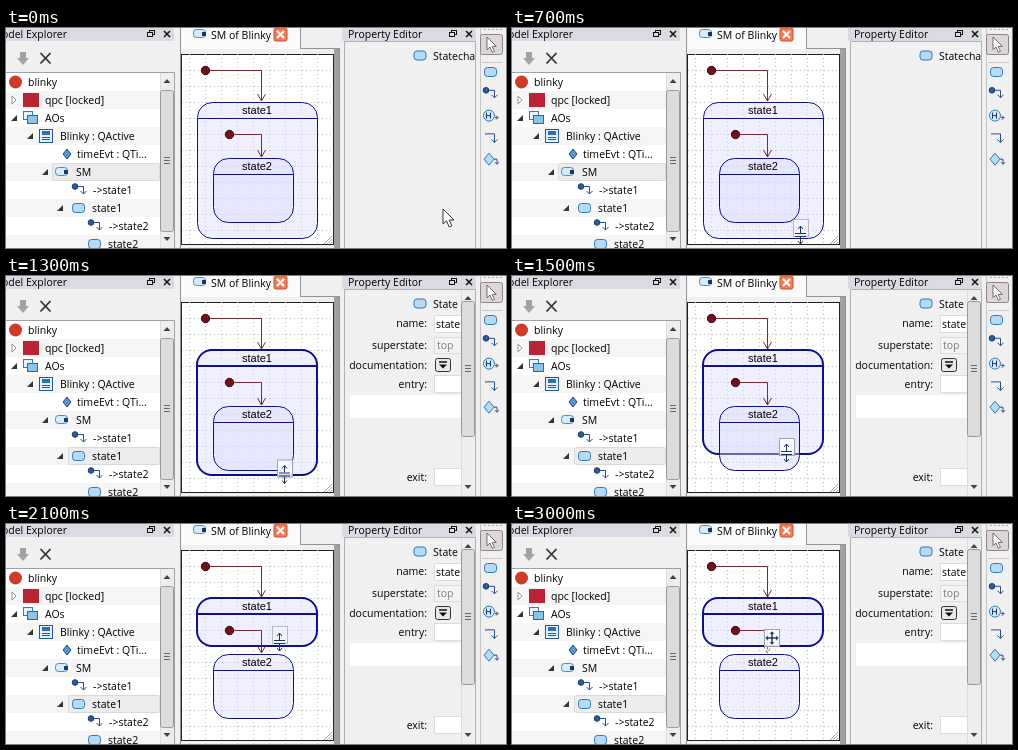
These frames come from a looping animation (500x220 px, 3.3 s). An HTML page:

```html
<!DOCTYPE html>
<html lang="en">
<head>
<meta charset="utf-8">
<title>State editor</title>
<style>
  html, body { margin: 0; width: 100%; height: 100%; overflow: hidden; }
  svg { display: block; width: 500px; height: 220px; }
  text { font: 10.5px "Open Sans", sans-serif; fill: #000; }
  .label { font: 11px "Liberation Sans", Arial, sans-serif; text-anchor: middle; }
  .end { text-anchor: end; }
  .line { fill: none; stroke: #782830; }
  .box { fill: #d8d8ff; fill-opacity: .42; stroke: #101088; }
</style>
</head>
<body>
<svg id="stage" viewBox="0 0 500 220" xmlns="http://www.w3.org/2000/svg"></svg>
<script>
const stage = document.getElementById('stage');
const LOOP = 3300;

const rect = (x, y, w, h, fill, more = '') =>
  `<rect x="${x}" y="${y}" width="${w}" height="${h}" fill="${fill}" ${more}/>`;
const path = (d, stroke, more = '') => `<path d="${d}" fill="none" stroke="${stroke}" ${more}/>`;
const shape = (d, fill, more = '') => `<path d="${d}" fill="${fill}" ${more}/>`;
const dot = (x, y, r, fill, more = '') => `<circle cx="${x}" cy="${y}" r="${r}" fill="${fill}" ${more}/>`;
const text = (x, y, s, more = '') => `<text x="${x}" y="${y}" ${more}>${s}</text>`;
const at = (x, y, s) => `<g transform="translate(${x} ${y})">${s}</g>`;
const group = (id, s) => `<g id="${id}">${s}</g>`;
const outline = c => `stroke="${c}"`;

// Icons, centred on 0,0
const icons = {
  state: rect(-5.5, -4.5, 12, 9, '#b4dcf8', 'rx="3" stroke="#3078b0"'),
  chart: rect(-6.5, -4.5, 12, 8, '#d4ecfc', 'rx="3" stroke="#4a8cc0"') + rect(2, -2, 4, 4, '#14386c'),
  arrow: path('M-4 -3.5H4.5V4m-3 -3l3 3l3 -3', '#284c88') + dot(-4, -3.5, 2.8, '#2c5c9c', outline('#183868')),
  ball: dot(-.5, 0, 6.5, '#d03a28'),
  mark: rect(-8, -7, 16, 14, '#b82434'),
  folder: rect(-7.5, -6.5, 9, 8, '#e4f2fc', outline('#3c78b0')) +
    rect(-3.5, -2.5, 10, 8, '#8cc4ec', outline('#2c68a0')),
  class: rect(-6.5, -6.5, 13, 13, '#e4f2fc', outline('#205890')) + rect(-4, -5, 8, 4, '#3070b0') +
    path('M-4 1.5H4M-4 3.5H4', '#205890'),
  diamond: shape('M0 -5L4 0L0 5L-4 0z', '#5c94cc', outline('#1c4880')),
  history: dot(-1, 0, 5.5, '#d4eafa', outline('#3878a8')) +
    path('M-3.5 -3V3M.5 -3V3M-3.5 0H.5', '#14386c') + path('M5 2h3m-2 -2l2 2l-2 2', '#284c88'),
  bend: path('M-5 -3.5H4.5V5m-3 -3l3 3l3 -3', '#284c88'),
  choice: shape('M-1 -6L4 0L-1 6L-6 0z', '#b4dcf8', outline('#3078b0')) +
    path('M4 0H7V5m-2 -2l2 2l2 -2', '#284c88')
};
const icon = (name, x, y) => at(x, y, icons[name]);

const pointer = 'M0 0V15L3.5 11.8L6.2 18L8.8 16.8L6.1 11H11z';
const sizer = 'M0 -9V-2M0 2V9M-2.5 -6L0 -9L2.5 -6M-2.5 6L0 9L2.5 6M-5.5 -1.5H5.5M-5.5 1.5H5.5';
const mover = 'M0 -7L3 -4H1V-1H4V-3L7 0L4 3V1H1V4H3L0 7L-3 4H-1V1H-4V3L-7 0L-4 -3V-1H-1V-4H-3z';

const titleBar = (x, w) => rect(x, 0, w, 13, '#dadae2');
const dockButtons = x =>
  rect(x - 1.5, 2.5, 5, 4, 'none', outline('#111')) +
  rect(x - 3.5, 4.5, 5, 4, '#dadae2', outline('#111')) +
  path(`M${x + 13} 3l6 6m0 -6l-6 6`, '#111', 'stroke-width="1.5"');

// Vertical bar with a thumb from top to bottom
function scrollBar(x, y, top, bottom) {
  const mid = x + 7, grip = Math.floor((top + bottom) / 2) + .5;
  let s = rect(x, y, 14, 220 - y, '#eee') + path(`M${x + .5} ${y}V220`, '#dcdcdc') +
    shape(`M${mid} ${y + 6}l3.5 4h-7z`, '#444') +
    rect(x + .5, top + .5, 13, bottom - top, '#dcdcdc', 'rx="2" stroke="#999"');
  for (const d of [-3, 0, 3]) s += path(`M${mid - 3} ${grip + d}h6`, '#666');
  return s + shape(`M${mid} 213l3.5 -4h-7z`, '#444');
}

function explorer() {
  // label, icon, icon x, fold mark x, open
  const rows = [
    ['blinky', 'ball', 10], ['qpc [locked]', 'mark', 25, 8, 0], ['AOs', 'folder', 25, 8, 1],
    ['Blinky : QActive', 'class', 40, 24, 1], ['timeEvt : QTi…', 'diamond', 61],
    ['SM', 'chart', 56, 39, 1], ['-&gt;state1', 'arrow', 73], ['state1', 'state', 72, 54, 1],
    ['-&gt;state2', 'arrow', 89], ['state2', 'state', 88]
  ];
  let s = titleBar(0, 168) + text(61, 10, 'Model Explorer', 'class="end"') + dockButtons(145) +
    rect(0, 13, 168, 32, '#f0f0f0') +
    shape('M17 37l-6 -7h3v-6h6v6h3z', '#a2a2a2') +
    path('M34.5 25l10 10.5m0 -10.5l-10 10.5', '#333', 'stroke-width="1.8"') +
    rect(0, 45, 168, 175, '#fff');
  rows.forEach((r, i) => { if (i % 2) s += rect(0, 45 + 18 * i, 154, 18, '#f5f5f5'); });
  s += rect(46.5, 135.5, 107, 17, '#ececec', 'id="pick" rx="2" stroke="#d9d9d9"');
  rows.forEach(([name, ic, x, fold, open], i) => {
    const y = 54 + 18 * i;
    if (fold) s += open ? shape(`M${fold + 3} ${y - 3}v6h-6z`, '#333')
      : shape(`M${fold - 2} ${y - 4}l4 4l-4 4z`, '#fff', outline('#999'));
    s += icon(ic, x, y) + text(ic === 'diamond' ? 71 : x + (i ? 14 : 12), y + 4, name);
  });
  return `<g clip-path="url(#left)">${s}${scrollBar(154, 45, 62, 203)}</g>` + path('M0 44.5H168.5V220', '#a0a0a0');
}

function state(id, name, x, y, w, h, r) {
  return group(id, `<rect class="box" x="${x}" y="${y}" width="${w}" height="${h}" rx="${r}"/>` +
    path(`M${x} ${y + 16}h${w}`, '#101088')) + text(251, y + 11.5, name, 'class="label"');
}

const initial = (x, y, end, id) =>
  `<path class="line" d="M${x} ${y}H255.5V${(y + end) / 2}"/>` +
  `<path id="${id}" class="line" d="M255.5 ${(y + end) / 2}V${end}m-4 -7l4 7l4 -7"/>` +
  dot(x, y, 4.2, '#701018', outline('#400810'));

function diagram() {
  let grid = '';
  for (let x = 183.5; x < 327; x += 16) grid += `M${x} 26V217`;
  for (let y = 42.5; y < 217; y += 16) grid += `M176 ${y}H327`;
  let grip = '';
  for (let i = 0; i < 3; i++) grip += `M${324 - 3 * i} 216l${2 + 3 * i} ${-2 - 3 * i}`;
  return rect(174, 20, 160, 200, '#f0f0f0') +
    rect(328, 20, 6, 200, '#a0a0a0') +
    path('M174.5 220V20.5H333.5V220', '#929292') +
    shape('M174.5 21V-2H294.5V21', '#fafafa', outline('#929292')) +
    icon('chart', 194, 6) + text(205, 11, 'SM of Blinky') +
    rect(268, 0, 13, 13, '#e88060', 'rx="2" stroke="#c05030"') +
    path('M271 3l7 7m0 -7l-7 7', '#fff', 'stroke-width="2"') +
    rect(175.5, 26.5, 152, 190, '#fff', outline('#222')) +
    path(grid, '#bebebe', 'stroke-dasharray="1 3"') +
    state('outer', 'state1', 191.5, 74.5, 120, 136, 15) +
    initial(199.5, 42.5, 73, 'tip1') +
    state('inner', 'state2', 207.5, 130.5, 80, 64, 15) +
    initial(223.5, 106.5, 129, 'tip2') + path(grip, '#a8a8a8');
}

function properties() {
  const field = (y, h, fill = '#fff') => rect(428.5, y, 30, h, fill, outline('#dcdcdc'));
  const name = (y, s) => text(421, y, s, 'class="end"');
  const form = text(427, 32, 'State') +
    name(51, 'name:') + field(39.5, 17) + text(430, 52, 'state1') +
    name(73, 'superstate:') + field(61.5, 16, '#f4f4f4') + text(431, 73, 'top', 'fill-opacity=".5"') +
    name(93, 'documentation:') + rect(429.5, 82.5, 15, 13, '#e8e8e8', 'rx="2" stroke="#333"') +
    path('M433 86h8', '#111', 'stroke-width="1.5"') + shape('M433 88.5h8l-4 4z', '#111') +
    name(112, 'entry:') + field(99.5, 17) + rect(344, 119, 111, 23, '#fff') +
    name(205, 'exit:') + field(192.5, 17) + scrollBar(455, 14, 25, 160);
  return `<g clip-path="url(#mid)">` + titleBar(336, 134) + text(342, 10, 'Property Editor') +
    dockButtons(447) + rect(338, 14, 132, 206, '#f0f0f0') + path('M338.5 220V13.5H469.5V220', '#b0b0b0') +
    icon('state', 413.5, 27.5) + group('blank', text(427, 32, 'Statechart')) + group('form', form) + '</g>';
}

function tools() {
  const names = ['state', 'arrow', 'history', 'bend', 'choice'];
  let s = rect(470, 0, 30, 220, '#f0f0f0') + path('M474.5 0V220', '#c4c4c4') +
    path('M478 1.5H497', '#aaa', 'stroke-dasharray="2 2"') +
    rect(474.5, 6.5, 22, 20, '#dcd6d8', 'rx="2" stroke="#8c8488"') +
    at(481, 9, shape(pointer, '#fff', 'stroke="#555" transform="scale(.85)"')) + path('M476 34.5H497', '#c8c8c8');
  names.forEach((n, i) => s += icon(n, 484, 44 + 21.8 * i));
  return s;
}

stage.innerHTML =
  '<defs><clipPath id="left"><path d="M0 0H168V220H0z"/></clipPath>' +
  '<clipPath id="mid"><path d="M333 0H470V220H333z"/></clipPath></defs>' +
  rect(0, 0, 500, 220, '#f0f0f0') + explorer() + diagram() + properties() + tools() +
  rect(-7.5, -8.5, 15, 17, '#fff', 'id="pad" stroke="#a09cac"') +
  shape(pointer, '#fff', 'id="arrow" stroke="#333"') +
  path(sizer, '#1c3458', 'id="sizer"') +
  shape(mover, '#24406c', 'id="mover" stroke="#fff" stroke-width=".5"');

const $ = id => document.getElementById(id);
const set = (el, attrs) => { for (const k in attrs) el.setAttribute(k, attrs[k]); };
const show = (id, on) => set($(id), { display: on ? 'inline' : 'none' });
const move = (id, x, y) => set($(id), { transform: `translate(${x} ${y})` });

// Linear interpolation through [time, ...values] keys
function track(keys, t) {
  const last = keys[keys.length - 1];
  if (t >= last[0]) return last.slice(1);
  const i = Math.max(1, keys.findIndex(k => k[0] > t));
  const a = keys[i - 1], b = keys[i];
  const p = Math.max(0, (t - a[0]) / (b[0] - a[0]));
  return a.slice(1).map((v, j) => v + (b[j + 1] - v) * p);
}

const arrowKeys = [[0, 437, 181], [600, 288, 196]];
// sizer x, y, pad x, y
const dragKeys = [
  [700, 288.5, 207, 289, 200], [900, 280.5, 209, 281, 203], [1200, 280.5, 209, 281, 203],
  [1500, 274.5, 177, 275, 171], [1800, 273.5, 135, 274, 129], [2100, 273.5, 118, 274, 111]
];
const edgeKeys = [[1200, 210.5], [1500, 178.5], [1800, 138.5], [2100, 122.5]];

function draw(ms) {
  const t = Math.floor(ms / 100) * 100;
  const picked = t >= 1300, moving = t >= 3000;
  const [edge] = track(edgeKeys, t);
  const [sx, sy, px, py] = track(dragKeys, t).map(v => Math.round(v * 2) / 2);
  const shift = picked ? -.5 : 0;

  set($('outer'), { 'stroke-width': picked ? 2 : 1 });
  move('outer', shift, shift);
  set($('outer').firstChild, { height: Math.round(edge - 74.5) });
  set($('pick'), picked ? { x: 62.5, y: 171.5, width: 91 } : { x: 46.5, y: 135.5, width: 107 });
  show('blank', !picked);
  show('form', picked);
  set($('tip2'), { 'stroke-dasharray': t >= 2500 ? '3 2' : 'none', 'stroke-opacity': t >= 2500 ? .65 : 1 });

  show('arrow', t < 700);
  show('sizer', t >= 700 && !moving);
  show('mover', moving);
  show('pad', t >= 700);
  move('arrow', ...track(arrowKeys, t));
  move('sizer', sx, sy);
  move('mover', 260, 114);
  move('pad', moving ? 260 : px, moving ? 114 : py);
  const firm = moving || (t >= 1200 && t < 2100);
  set($('pad'), { 'fill-opacity': firm ? .85 : .3, 'stroke-opacity': firm ? 1 : .7 });
}

const start = performance.now();
function tick() {
  draw((performance.now() - start) % LOOP);
  requestAnimationFrame(tick);
}
tick();
</script>
</body>
</html>
```
